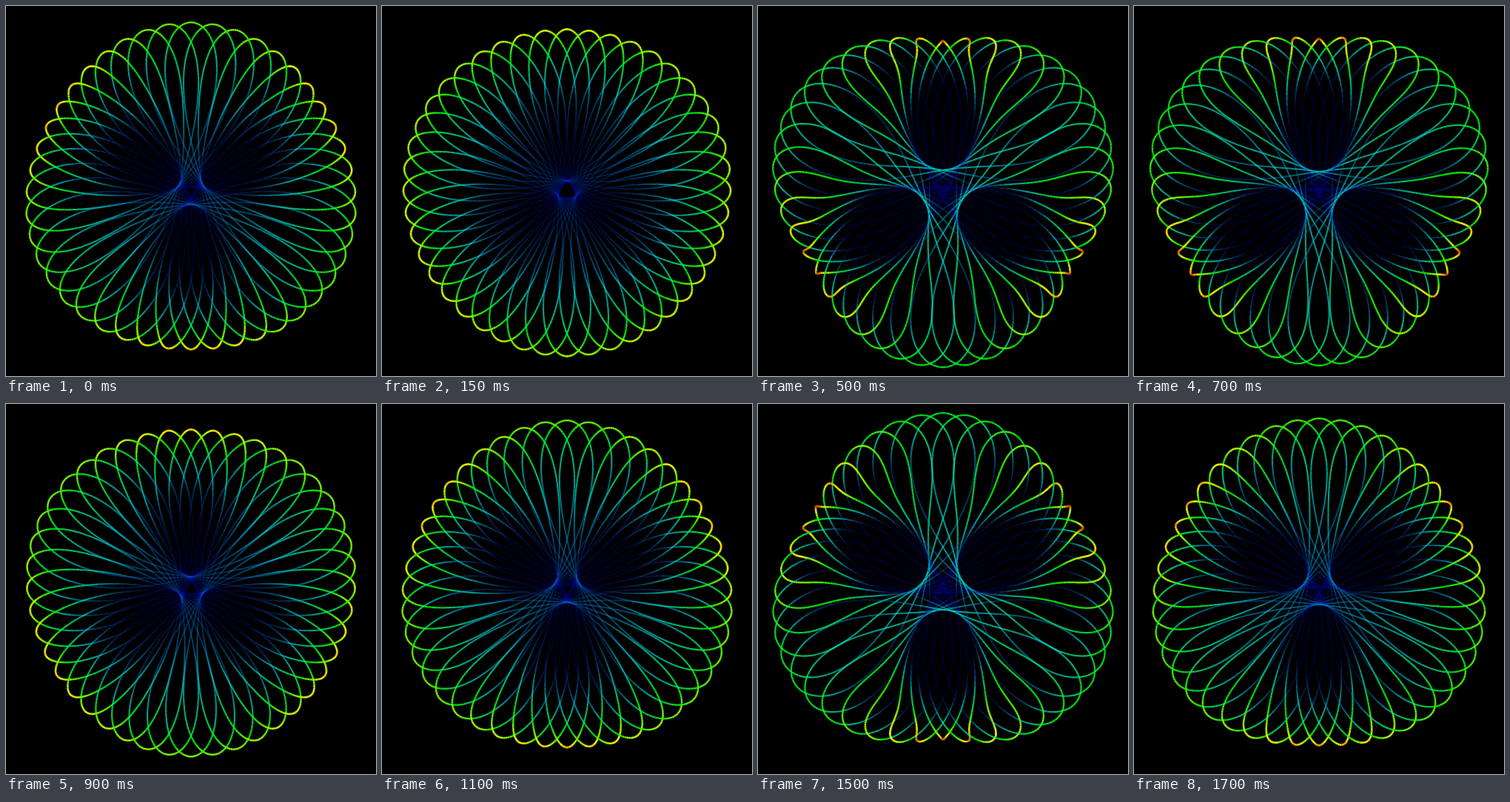
An HTML page with a canvas that plays this animation: 500x500 px, repeating every 1750 ms.

```html
<!DOCTYPE html>
<html lang="en">
<head>
<meta charset="utf-8">
<title>Breathing spirograph</title>
<style>
  html, body { margin: 0; width: 100%; height: 100%; overflow: hidden; background: #000; }
  canvas { display: block; width: 500px; height: 500px; }
</style>
</head>
<body>
<canvas id="stage" width="500" height="500"></canvas>
<script>
const ctx = document.getElementById('stage').getContext('2d');
const STEP = 50, STEPS = 35, PEAK = 11;
const CENTER = 250;
const PETALS = 44;
const SAMPLES = PETALS * 80;
const TAU = 2 * Math.PI;

// Three rotating arms: [turns per lap, length]; the last arm breathes.
const armsAt = step => [
  [29, 104.75],
  [29 - PETALS, 116.25],
  [74, -17.5 * Math.cos(TAU * (step - PEAK) / STEPS)]
];

function sample(arms, t) {
  let x = 0, y = 0, vx = 0, vy = 0;
  for (const [turns, length] of arms) {
    const c = length * Math.cos(turns * t), s = length * Math.sin(turns * t);
    x += s;
    y -= c;
    vx += turns * c;
    vy += turns * s;
  }
  return { x: CENTER + x, y: CENTER + y, speed: Math.hypot(vx, vy) };
}

// Slow parts are warm, solid and thick; fast parts are blue, faint and thin.
function setPen(speed) {
  const hue = Math.min(240, 12 + speed * 0.0455);
  const light = Math.max(38, 50 - 10 * (speed / 4800) ** 2);
  const alpha = Math.max(0.18, 1 - 0.27 * (speed / 3300) ** 3);
  ctx.strokeStyle = `hsla(${hue}, 100%, ${light}%, ${alpha})`;
  ctx.lineWidth = Math.max(1.9, 2.9 - speed / 4500);
}

function draw(step) {
  const arms = armsAt(step);
  ctx.fillStyle = '#000';
  ctx.fillRect(0, 0, 500, 500);
  let from = sample(arms, 0);
  for (let i = 1; i <= SAMPLES; i++) {
    const to = sample(arms, TAU * i / SAMPLES);
    setPen((from.speed + to.speed) / 2);
    ctx.beginPath();
    ctx.moveTo(from.x, from.y);
    ctx.lineTo(to.x, to.y);
    ctx.stroke();
    from = to;
  }
}

const start = performance.now();
let shown = -1;
function tick() {
  const elapsed = Math.max(0, performance.now() - start);
  const step = Math.floor(elapsed / STEP) % STEPS;
  if (step !== shown) draw(shown = step);
  requestAnimationFrame(tick);
}
tick();
</script>
</body>
</html>
```
